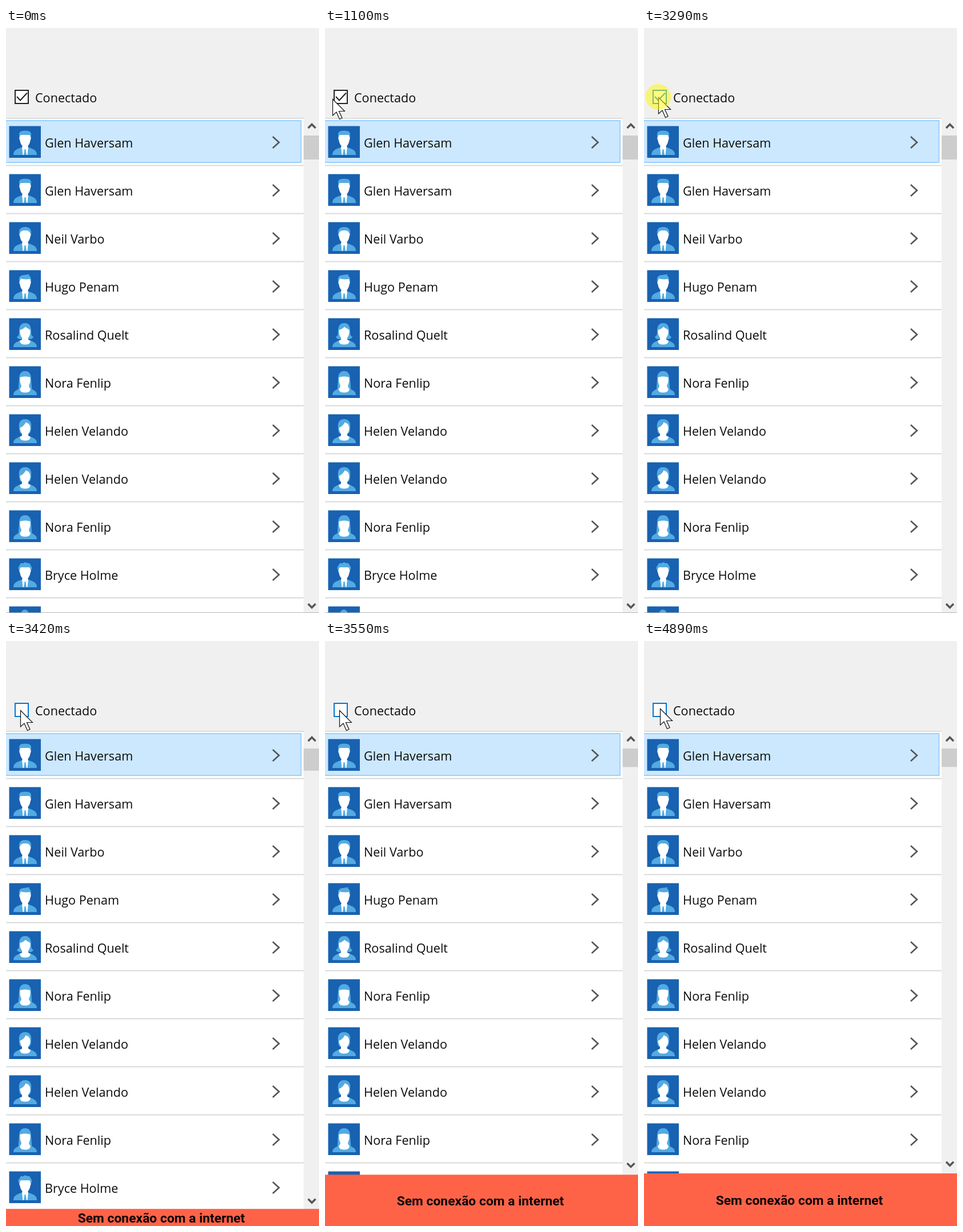
Recreate the animation shown at these times as an HTML page. Size 548 by 1023 pixels, loop 8 s.

```html
<!DOCTYPE html>
<html lang="pt">
<head>
<meta charset="utf-8">
<title>Lista de contatos</title>
<style>
  html, body { margin: 0; width: 100%; height: 100%; overflow: hidden; background: #f0f0f0; }
  svg { display: block; width: 100vw; height: 100vh; }
  text { font: 21.6px "Open Sans", "Noto Sans", sans-serif; fill: #0c0c0c; }
  #message { font: 700 22.85px Roboto, sans-serif; fill: #0c0406; text-anchor: middle; }
  .line { fill: none; stroke: #555; stroke-width: 2.6; }
  .blue { fill: #54aae2; }
  .white { fill: #fff; }
</style>
</head>
<body>
<svg viewBox="0 0 548 1023">
  <defs>
    <g id="suit">
      <path class="blue" d="M7 50C7 42 12 40 21 37H34C43 40 48 42 48 50Z"/>
      <path class="white" d="M22 36L23.500 50H31.500L33 36Z"/>
      <path class="blue" d="M25.500 39.500H29.500L28.700 42 30 50H25L26.300 42Z"/>
    </g>
    <g id="dress">
      <path class="blue" d="M7 50C7 43 12 41 21 37.500H34C43 41 48 43 48 50Z"/>
      <path class="white" d="M22 32H33V37L37 39C36 45 32 45.500 27.500 45.500S19 45 18 39L22 37Z"/>
    </g>
    <path id="face" class="white" d="M18.500 14H36.500C38 19 38 23 36.500 24.500 36 30 33.500 32.500 32.500 34V37L27.500 41 22.500 37V34C21.500 32.500 19 30 18.500 24.500 17 23 17 19 18.500 14Z"/>
    <path id="flat" class="blue" d="M17.500 20C16 11 17 7.500 27.500 7.500S39 11 37.500 20L35.500 15H19.500Z"/>
    <path id="round" class="blue" d="M17.500 22C15 12 20 8 27.500 8S40 12 37.500 22L36 18C34 14 31 14 27.500 14S21 14 19 18Z"/>
    <path id="swept" class="blue" d="M17.500 21C15 11 20 8 25 8L35 6.500 34 8.500C38 11 38.500 16 37.500 21L36 15C28 16 22 15 20 14Z"/>
    <path id="curly" class="blue" d="M17.500 21C14 17 16 13 18 12 18 8 22 7 24 8.500 26 6 29 6 31 8 35 7 37 9 37 12 40 14 40 18 37.500 21L36 16C32 14 30 16 27.500 15 24 16 22 14 19 16Z"/>
    <path id="flip" class="blue" d="M27.500 8C18 8 17 16 17 24 17 30 15 31 13 32 14 36 19 37 23 35H32C36 37 41 36 42 32 40 31 38 30 38 24 38 16 37 8 27.500 8Z"/>
    <path id="long" class="blue" d="M27.500 8C19 8 17 15 17 22L15.500 42H39.500L38 22C38 15 36 8 27.500 8Z"/>
    <path id="bob" class="blue" d="M27.500 8C18 8 16 15 17 23 17 29 18 33 22 34H33C37 33 38 29 38 23 39 15 37 8 27.500 8Z"/>
    <path id="low" class="white" d="M18.500 20C23 19 26 17 28 14.500 31 17 34 18 36.500 20V25C36 30 33.500 33 31.500 35H23.500C21.500 33 19 30 18.500 25Z"/>
    <path id="side" class="white" d="M18.500 23C24 21 27 17 28.500 13.500 34 15 36.500 18 36.500 25 36 30 33.500 33 31.500 35H23.500C21.500 33 19 30 18.500 23Z"/>
    <path id="veil" class="white" d="M18.500 19C23 17 32 17 36.500 19V25C36.500 29 34.500 31 34 34L36.500 40C34 46 21 46 18.500 40L21 34C20.500 31 18.500 29 18.500 25Z"/>
    <ellipse id="bun" class="blue" cx="27" cy="11.500" rx="6.500" ry="6.500"/>
  </defs>

  <rect width="548" height="1023" fill="#f0f0f0"/>
  <rect y="159" width="521" height="864" fill="#fff"/>
  <path d="M0 158H521" stroke="#dcdcdc" stroke-width="2"/>
  <rect x="-2" y="162" width="518.500" height="73" fill="#cce8ff" stroke="#99d1ff" stroke-width="2"/>
  <g id="rows"></g>
  <path d="M0 1022.500H548" stroke="#b4b4b4"/>

  <rect x="521" y="159" width="27" height="863" fill="#f0f0f0"/>
  <rect id="thumb" x="521" y="188" width="27" fill="#cdcdcd"/>
  <path class="line" style="stroke-width:3.400" d="M529 175L535.500 168.500 542 175"/>
  <path id="down" class="line" style="stroke-width:3.400" d="M529 -3L535.500 3.500 542 -3"/>

  <g id="box" fill="none" stroke-width="2">
    <rect x="16" y="109" width="23" height="23" fill="#fff"/>
    <path id="tick" d="M19 120L25 126.500 37 113.500"/>
  </g>
  <text x="51" y="130">Conectado</text>

  <g id="banner">
    <rect id="bannerFill" width="548" fill="#ff6347"/>
    <text id="message" x="272">Sem conexão com a internet</text>
  </g>
  <path id="cursor" d="M.5 .5V29L7 23 12.500 35.500 17 33.500 11.500 21.500H21.500Z" fill="#fff" stroke="#111" stroke-width="1.200"/>
  <circle id="press" cx="25" cy="120.500" r="22.500" fill="#fffa00" opacity=".5"/>
</svg>
<script>
const LOOP = 8000, ROW = 84;
const $ = id => document.getElementById(id);
const lerp = (a, b, u) => a + (b - a) * u;
const clamp = u => Math.min(1, Math.max(0, u));

const looks = {
  flat: ['suit', 'face', 'flat'],
  round: ['suit', 'face', 'round'],
  swept: ['suit', 'face', 'swept'],
  curly: ['suit', 'face', 'curly'],
  flip: ['flip', 'dress', 'low'],
  long: ['long', 'dress', 'veil'],
  bob: ['bob', 'dress', 'side'],
  bun: ['bun']
};
const contacts = [
  ['Glen Haversam', 'flat'], ['Glen Haversam', 'flat'], ['Neil Varbo', 'round'],
  ['Hugo Penam', 'swept'], ['Rosalind Quelt', 'flip'], ['Nora Fenlip', 'long'],
  ['Helen Velando', 'bob'], ['Helen Velando', 'bob'], ['Nora Fenlip', 'long'],
  ['Bryce Holme', 'curly'], ['', 'bun']
];

$('rows').innerHTML = contacts.map(([name, look], i) => `
  <g transform="translate(0 ${159 + ROW * i})">
    <g transform="translate(6 13)">
      <rect x="-.5" y="-.5" width="55.500" height="55.500" fill="#1862b1"/>
      ${looks[look].map(part => `<use href="#${part}"/>`).join('')}
    </g>
    <text x="68" y="50">${name}</text>
    <path class="line" d="M467 31L478 41 467 51"/>
    <path d="M0 81.500H521" stroke="#dadada" stroke-width="2"/>
  </g>`).join('');

function cursorAt(t) {
  if (t < 1100) {
    const u = clamp(Math.floor((t - 492) / 66.67) / 6);
    return [lerp(8, 369, (1 - u) ** 2.8), lerp(79, 125, u)];
  }
  if (t < 4890) {
    const u = clamp((Math.floor((t - 1100) / 80) + 1) / 6);
    const eased = 1 - (1 - u) ** 2;
    return [lerp(8, 25, eased), lerp(125, 121, eased)];
  }
  return [28, 118];
}

function bannerHeight(t) {
  if (t < 3360) return 0;
  const step = Math.floor((t - 3355) / 64) * 65;
  return 92 * clamp(step / 200);
}

const show = (id, on) => $(id).setAttribute('visibility', on ? 'visible' : 'hidden');

function render(t) {
  const [x, y] = cursorAt(t), h = bannerHeight(t);
  show('cursor', t >= 500);
  $('cursor').setAttribute('transform', `translate(${Math.round(x)} ${Math.round(y)})`);

  const hover = t >= 1100 && x >= 14;
  $('box').setAttribute('stroke', hover ? '#0078d7' : '#222');
  show('tick', t < 3360);
  show('press', t >= 3290 && t < 3420);

  show('banner', h > 0);
  $('bannerFill').setAttribute('y', 1023 - h);
  $('bannerFill').setAttribute('height', h);
  $('message').setAttribute('y', 1023 - h / 2 + 9);
  $('thumb').setAttribute('height', 42 - h * .107);
  $('down').setAttribute('transform', `translate(0 ${1010 - h * 1.046})`);
}

const start = performance.now();
function frame() {
  render((performance.now() - start) % LOOP);
  requestAnimationFrame(frame);
}
render(0);
requestAnimationFrame(frame);
</script>
</body>
</html>
```
